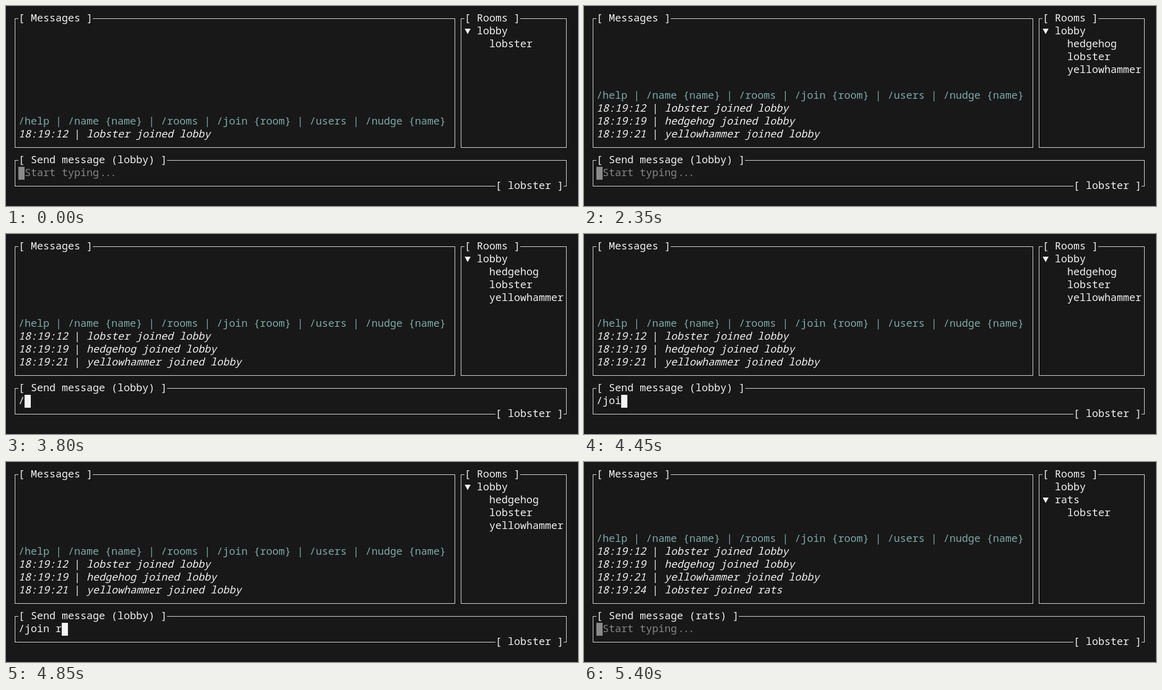
Animation, 1108 px wide and 388 px high, one loop 8000 ms. Source, as an HTML page:

```html
<!DOCTYPE html>
<html lang="en">
<head>
<meta charset="utf-8">
<title>Terminal chat</title>
<style>
  html, body { margin: 0; width: 100%; height: 100%; overflow: hidden; background: #181818; }
  svg { display: block; width: 100vw; height: 100vh; }
  text { font: 20px "Noto Sans Mono", "DejaVu Sans Mono", monospace; white-space: pre; fill: #f0f0f0; font-variant-ligatures: none; }
  .frame { fill: none; stroke: #f0f0f0; stroke-width: 1; shape-rendering: crispEdges; }
  .help { fill: #7da9a7; }
  .join { font-style: italic; }
  .bar { font-style: normal; }
  .hint { fill: #858585; }
  .dots { letter-spacing: -2px; }
  .arrow { fill: #f0f0f0; }
</style>
</head>
<body>
<svg viewBox="0 0 1108 388">
  <g class="frame">
    <path d="M24 24.5H17.5V274.5H869.5V24.5H168"/>
    <path d="M888 24.5H881.5V274.5H1085.5V24.5H996"/>
    <path id="inputFrame"/>
  </g>
  <text x="24" y="30">[ Messages ]</text>
  <text x="888" y="30">[ Rooms ]</text>
  <text x="948" y="355" id="self"></text>
  <text x="24" y="305" id="inputTitle"></text>
  <g id="log"></g>
  <g id="rooms"></g>
  <rect id="cursor" y="312" width="12" height="25"/>
  <text x="36" y="330" class="hint" id="hint">Start typing<tspan class="dots" dx="2">...</tspan></text>
  <text x="24" y="330" id="typed"></text>
</svg>
<script>
const LOOP = 8000, CELL = 12, ROW = 25, LEFT = 24, BASE = 30;
const SWITCH = 5400;
const ME = "lobster";
const HELP = "/help | /name {name} | /rooms | /join {room} | /users | /nudge {name}";
const COMMAND = "/join rats";
const KEYS = [3800, 4100, 4300, 4450, 4600, 4650, 4850, 4900, 5050, 5150];
const JOINS = [
  { at: 0, clock: "18:19:12", user: ME, room: "lobby" },
  { at: 1050, clock: "18:19:19", user: "hedgehog", room: "lobby" },
  { at: 2350, clock: "18:19:21", user: "yellowhammer", room: "lobby" },
  { at: SWITCH, clock: "18:19:24", user: ME, room: "rats" }
];

const el = id => document.getElementById(id);
const line = (x, row, content, cls = "") =>
  `<text x="${x}" y="${BASE + row * ROW}" class="${cls}">${content}</text>`;

function drawLog(joins) {
  const top = 9 - joins.length;
  el("log").innerHTML = line(LEFT, top, HELP, "help") + joins.map((j, i) =>
    line(LEFT, top + 1 + i,
      `${j.clock} <tspan class="bar">|</tspan> ${j.user} joined ${j.room}`, "join")).join("");
}

function drawRooms(joins, room) {
  const names = room === "lobby" ? ["lobby"] : ["lobby", room];
  const users = joins.filter(j => j.room === room).map(j => j.user).sort();
  const open = names.length;
  const y = 44 + (open - 1) * ROW;
  el("rooms").innerHTML =
    `<path class="arrow" d="M888.5 ${y}h11.5l-5.75 10.5z"/>` +
    names.map((n, i) => line(912, 1 + i, n)).join("") +
    users.map((u, i) => line(936, 1 + open + i, u)).join("");
}

function drawInput(room, typed) {
  const title = `[ Send message (${room}) ]`;
  const end = LEFT + title.length * CELL;
  el("inputTitle").textContent = title;
  el("inputFrame").setAttribute("d",
    `M24 299.5H17.5V349.5H948M1080 349.5H1085.5V299.5H${end}`);
  el("typed").textContent = typed;
  el("hint").style.display = typed ? "none" : "";
  el("cursor").setAttribute("x", LEFT + typed.length * CELL);
  el("cursor").setAttribute("fill", typed ? "#f3f3f3" : "#8a8a8a");
}

let shown = "";
function tick(now) {
  const t = now % LOOP;
  const joins = JOINS.filter(j => t >= j.at);
  const room = t < SWITCH ? "lobby" : "rats";
  const count = t < SWITCH ? KEYS.filter(k => t >= k).length : 0;
  const state = joins.length + ":" + count;
  if (state !== shown) {
    shown = state;
    drawLog(joins);
    drawRooms(joins, room);
    drawInput(room, COMMAND.slice(0, count));
  }
  requestAnimationFrame(tick);
}

el("self").textContent = `[ ${ME} ]`;
tick(performance.now());
</script>
</body>
</html>
```
